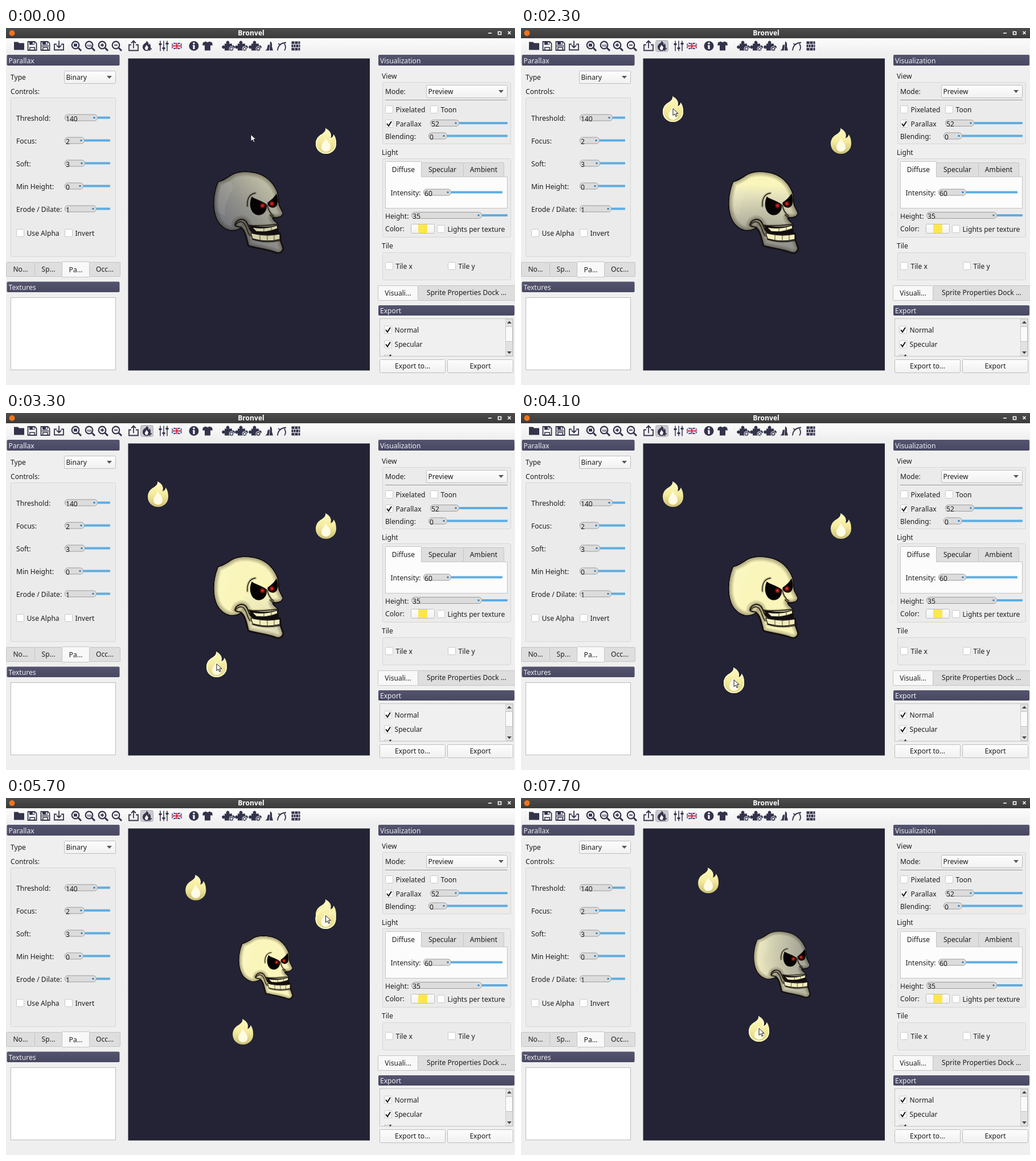
An HTML page with a canvas for the animation above (8 s loop, 894 px wide and 627 px high).

```html
<!DOCTYPE html>
<html lang="en">
<head>
<meta charset="utf-8">
<title>Bronvel</title>
<style>
html, body { margin: 0; width: 100%; height: 100%; overflow: hidden; background: #efefef; }
svg, canvas { position: absolute; left: 0; top: 0; }
text { font: 12.1px "Noto Sans", "Open Sans", sans-serif; }
</style>
</head>
<body>
<svg id="ui" width="894" height="627"></svg>
<canvas id="stage" width="894" height="627"></canvas>
<script>
const INK = '#33334c', LINE = '#bdbdbd';
const FLAME = 'M-1-22.5C6-19 11-13 8-5C11-6 13-8 13.5-11.5C17-7 18-1 18 5C18 15 10 22.5 0 22.5C-10 22.5-18 15-18 5C-18-2-15-7-10-10.5C-4-14 0-17-1-22.5Z';
const DROP = 'M-1.5-5C3 0 8 4 8 10.5C8 16 4 18.5 0 18.5C-4 18.5-8 16-8 10.5C-8 4-2 2-1.5-5Z';

// ---------- static window ----------
const rect = (x, y, w, h, fill, stroke = 'none', r = 0) => {
  const o = stroke === 'none' ? 0 : .5;
  return `<rect x="${x + o}" y="${y + o}" width="${w - 2 * o}" height="${h - 2 * o}" rx="${r}" fill="${fill}" stroke="${stroke}"/>`;
};
const text = (x, y, s, anchor = 'start', fill = '#1c1c1c', extra = '') =>
  `<text x="${x}" y="${y + 4.4}" text-anchor="${anchor}" fill="${fill}" ${extra}>${s}</text>`;
const path = (d, fill = INK, stroke = 'none', w = 1) =>
  `<path d="${d}" fill="${fill}" fill-rule="evenodd" stroke="${stroke}" stroke-width="${w}"/>`;
const wire = (d, w = 2) => path(d, 'none', INK, w);
const at = (x, y, s) => `<g transform="translate(${x} ${y})">${s}</g>`;
const group = (x, y, w, h) => rect(x, y, w, h, '#ebebeb', '#d6d6d6', 2);
const dock = (x, y, w, h, s) => rect(x, y, w, h, 'url(#dock)', 'none', 2) + text(x + 3, y + h / 2 + .6, s, 'start', '#f0f0f4');
const button = (x, y, w, h, s) => rect(x, y, w, h, 'url(#btn)', LINE, 2) + text(x + w / 2, y + h / 2, s, 'middle');
const combo = (x, y, w, s) => rect(x, y, w, 23, 'url(#btn)', LINE, 2) + text(x + 3.5, y + 12, s) +
  path(`M${x + w - 16} ${y + 9}h9l-4.5 5z`, '#555');
const check = (x, y, s, on) => rect(x, y - 7, 14, 14, '#fff', '#c9c9c9', 1) + text(x + 18.5, y + .4, s) +
  (on ? path(`M${x + 3} ${y}l3 4 5-8`, 'none', '#111', 2) : '');
const slider = (x, y, right, end, value) =>
  rect(right, y - 2, end - right, 4, '#5dade2', 'none', 1) +
  rect(x, y - 6, right - x, 12, '#dcdcdc', '#9b9b9b', 5) +
  rect(right - 7.5, y - 1.5, 3, 3, '#2f86c6') + text(x + 2, y + 1.6, value);
const tab = (x, y, w, h, s, on, fill = '#f8f8f8') =>
  rect(x, on ? y : y + 1, w, on ? h : h - 1, on ? fill : '#dedede', '#c4c4c4', 1) + text(x + w / 2, y + h / 2 + .5, s, 'middle');

const disk = wire('M-7.5-7.500h12l3 3v12h-15z', 1.8) + path('M-5-8h9v6h-9zM1-7v4h2v-4zM-5 2h10v6h-10zM-3.500 3.500v3h7v-3z');
const zoom = inner => `<circle cx="-1" cy="-1.5" r="6.3" fill="none" stroke="${INK}" stroke-width="2.2"/>` + wire('M4 3.5l5 5', 3) + inner;
const puzzle = mark => path('M-7-4h3.500a2.800 2.800 0 1 1 4 0h5.500v4a2.800 2.800 0 1 1 0 4v4h-13v-4a2.800 2.800 0 1 1 0-4z') +
  `<circle cx="5" cy="5" r="4" fill="${INK}" stroke="#f6f6f6"/>` + path(mark, 'none', '#f6f6f6', 1.3);
const icons = [
  [23, path('M-9-7h7l2 2h9v12h-18z')],
  [46, disk],
  [69, disk + path('M-6 0h12', 'none', INK, 1.5)],
  [93, wire('M-4-3h-4v10h16v-10h-4M0-9v11M-4-1l4 4 4-4', 1.8)],
  [123, zoom(path('M-4-4h6v5h-6z'))],
  [147, zoom(text(-1, -3.4, '100', 'middle', INK, 'style="font-size:5px;font-weight:bold"'))],
  [170, zoom(wire('M-4-1.5h6M-1-4.5v6', 1.8))],
  [194, zoom(wire('M-4-1.5h6', 1.8))],
  [224, wire('M-4-2h-4v10h16v-10h-4M0 4v-12M-4-5l4-4 4 4', 1.8)],
  [247, `<g transform="scale(.39)">${path(FLAME)}${path(DROP, '#f6f6f6')}</g>` + wire('M2 5h7M5.5 1.5v7', 2)],
  [277, wire('M-6-9v18M0-9v18M6-9v18', 1.5) + wire('M-8.5-3h5M-2.5 4h5M3.5-4h5', 3)],
  [300, rect(-9, -5.5, 18, 11, '#2b3d85') + path('M-9-5.5l18 11M9-5.5l-18 11', 'none', '#fff', 2) +
    path('M0-5.5v11M-9 0h18', 'none', '#fff', 4) + path('M0-5.5v11M-9 0h18', 'none', '#d32239', 2.2)],
  [330, `<circle r="8.5" fill="${INK}"/>` + path('M-1.5-6h3v3h-3zM-2-1.5h3.5v7h-3v-5h-.5z', '#fff')],
  [354, path('M-3-8L-8-6-9-1H-5V8H5V-1H9L8-6 3-8Q0-5-3-8z')],
  [391, puzzle('M2.5 5h5M5 2.5v5')],
  [414, puzzle('M3 3l4 4M7 3l-4 4')],
  [438, puzzle('M5 3v4M3 5h4')],
  [462, path('M-7 8q4-2 4-6l1-4h3l-1 10zM1 8l1-16q4 1 3 9l2 7z')],
  [485, wire('M-8 8q1-13 15-14M-7-4l5 2M4 8q4-5 0-12', 1.8)],
  [509, path('M-7.5-8h15v16h-15z') + path('M-8-3h16M-8 3h16M-2-8v5M4-8v5M0-3v6M-4-3v6M5-3v6M-2 3v5M4 3v5', 'none', '#f6f6f6')]
];
const shade = (id, a, b) => `<linearGradient id="${id}" x2="0" y2="1"><stop stop-color="${a}"/><stop offset="1" stop-color="${b}"/></linearGradient>`;

document.getElementById('ui').innerHTML = [
  '<defs>', shade('bar', '#4d4d4d', '#3a3a3a'), shade('tool', '#fcfcfc', '#efefef'),
  shade('dock', '#54546f', '#484862'), shade('btn', '#fdfdfd', '#f1f1f1'), '</defs>',
  rect(0, 0, 894, 18, 'url(#bar)'), rect(0, 18, 894, 28, 'url(#tool)'),
  '<circle cx="10.5" cy="9" r="5" fill="#f0741e"/>',
  text(430.5, 8.6, 'Bronvel', 'middle', '#fff', 'style="font-weight:bold"'),
  path('M847 9h6M864.500 6.500h5v5h-5zM881.500 6l5 5M886.500 6l-5 5', 'none', '#fff', 1.6),
  rect(236, 21, 23, 21, '#c9c9ce', '#b4b4ba', 3).replace('<rect', '<rect id="pressed"'),
  path([8, 266, 375].map(x => `M${x} 24v15`).join(''), 'none', '#ddd').replace('<path', '<path stroke-dasharray="1 2"'),
  ...icons.map(([x, s]) => at(x, 31.5, s)),

  dock(1.5, 47, 198, 19, 'Parallax'),
  text(8, 87, 'Type'), combo(102, 75, 91, 'Binary'), text(8, 112, 'Controls:'),
  group(8, 122, 185, 280),
  ...[['Threshold:', 161, 140], ['Focus:', 138, 2], ['Soft:', 139, 3], ['Min Height:', 136, 0], ['Erode / Dilate:', 159, 1]]
    .map(([s, right, v], i) => text(18, 159 + 40 * i, s) + slider(103, 157.5 + 40 * i, right, 183, v)),
  check(18, 360, 'Use Alpha'), check(103, 360, 'Invert'),
  tab(0, 410, 51, 27, 'No...'), tab(50, 410, 49, 27, 'Sp...'), tab(146, 410, 55, 27, 'Occ...'), tab(98, 410, 49, 28, 'Pa...', 1),
  dock(1.5, 445.5, 198, 18.5, 'Textures'), rect(8, 473, 185, 128, '#fff', '#bcbcbc'),

  dock(654, 47, 239, 19, 'Visualization'),
  text(660, 85, 'View'), group(661, 95, 226, 109),
  text(666, 112, 'Mode:'), combo(738, 100, 143, 'Preview'), rect(666, 126, 215, 1, '#999'),
  check(666, 143, 'Pixelated'), check(745, 143, 'Toon'), check(666, 168, 'Parallax', 1),
  slider(745, 167, 796, 881, 52), text(666, 191, 'Blending:'), slider(742, 189.5, 775, 881, 0),
  text(660, 219, 'Light'), group(661, 229, 226, 139),
  rect(666, 261, 215, 56, '#fcfcfc', '#c4c4c4'),
  tab(729, 235, 75, 27, 'Specular'), tab(803, 235, 72, 27, 'Ambient'), tab(666, 234, 64, 28, 'Diffuse', 1, '#fcfcfc'),
  rect(667, 260, 62, 3, '#fcfcfc'),
  text(675.5, 290, 'Intensity:'), slider(733, 288.5, 782, 872, 60),
  text(666, 330.5, 'Height:'), slider(712, 329, 836, 881, 35),
  text(666, 353, 'Color:'), rect(711, 344, 42, 17, 'url(#btn)', LINE, 2), rect(724, 345, 16, 15, '#fde74c'),
  check(757, 353, 'Lights per texture'),
  text(660, 383, 'Tile'), group(661, 394, 226, 49), check(666, 418, 'Tile x'), check(776, 418, 'Tile y'),
  tab(723, 451, 175, 28, ''), text(739, 465, 'Sprite Properties Dock ...'), tab(653, 452, 71, 27, 'Visuali...', 1),
  dock(654, 487, 239, 18, 'Export'), rect(656, 510, 235, 67, '#f0f0f0', '#c4c4c4'),
  check(664, 530, 'Normal', 1), check(664, 555.5, 'Specular', 1),
  rect(664, 574, 14, 3, '#fff', '#bdbdbd'), path('M674 576l2-2', 'none', '#111', 2),
  rect(877, 511, 13, 65, '#e2e2e2', '#cfcfcf'), rect(877, 524, 13, 27, '#fafafa', '#c4c4c4'),
  path('M880 519h8l-4-4.500zM880 568h8l-4 4.500z', '#444'),
  button(656, 582, 116, 24, 'Export to...'), button(775, 582, 116, 24, 'Export'),
  path('M204 326v7M650 326v7M97 440h7', 'none', '#ccc').replace('<path', '<path stroke-dasharray="1 2"'),
  rect(214.5, 53.5, 424.5, 548, '#232335')
].join('');

// ---------- motion ----------
const END = Infinity;
const ease = {
  both: u => u * u * (3 - 2 * u),
  out: u => 1 - (1 - u) ** 2,
  in: u => u ** 1.5
};
// time, x, y, easing on the way there
const route = [
  [200, 430, 188], [1000, 246, 33, 'both'], [1300, 246, 33, 'both'],
  [2200, 266, 141, 'both'], [2300, 267, 142.5, 'both'], [2800, 267, 142.5, 'both'],
  [3300, 370, 441.5, 'both'], [3600, 374, 469.5, 'out'], [4300, 374, 469.5, 'both'],
  [4700, 551, 240, 'both'], [5200, 561.5, 211.5, 'out'], [5400, 561.5, 207.5, 'both'],
  [6300, 561.5, 207.5, 'both'], [6700, 531.5, 384.5, 'in'], [7200, 418, 405.5, 'out']
];
const placed = [
  { x: 562, y: 198.5, from: 0, to: 5900 },
  { x: 267, y: 142.5, from: 2700, to: END },
  { x: 374, y: 469.5, from: 4100, to: 7700 }
];
const zooms = [[5700, 561.5, 207.5, .775], [7500, 418, 405.5, 1.05]];
const ADD = 1400;

function along(t) {
  const i = route.findIndex(k => k[0] > t);
  if (i === 0) return { x: route[0][1], y: route[0][2] };
  if (i < 0) return { x: route.at(-1)[1], y: route.at(-1)[2] };
  const [t0, x0, y0] = route[i - 1], [t1, x1, y1, kind] = route[i];
  const u = ease[kind]((t - t0) / (t1 - t0));
  return { x: x0 + (x1 - x0) * u, y: y0 + (y1 - y0) * u };
}
function viewAt(t) {
  const v = { k: 1, x: 0, y: 0 };
  for (const [start, cx, cy, k] of zooms) if (t >= start) {
    v.k *= k;
    v.x = cx + (v.x - cx) * k;
    v.y = cy + (v.y - cy) * k;
  }
  return v;
}

// ---------- drawing ----------
const c = document.getElementById('stage').getContext('2d');
const P = d => new Path2D(d);
const flame = P(FLAME), drop = P(DROP);
const arrow = P('M0 0V12L3 9.400 5 14 7 13 5 8.600H9Z');
const cranium = P('M373 271C383 268 390 263 398 258C406 253.500 420 252 433 254.500C453 257 468 270 475 287C479 297 477 305 479 312L485.500 325C483 333 474 333 467 333C468 339 475 341 477 346C477 352 470 353 462 354C448 357 436 356 428 351L420 343C412 352 405 356 393 354.500C378 350 368 338 366 315C365 297 368 284 373 271Z');
const jaw = P('M402 346C404 337 414 333 421 339C427 346 426 355 433 359C448 363 465 364 481 361L482 374L486.500 387C485 394 480 396 474 394C455 387 440 387 426 382C423 371 421 356 413 350C408 348 404 350 402 346Z');
const mouth = P('M426 345C445 351 465 350 476 346L478 352L480 363L434 362Z');
const upperTeeth = P('M432 350C445 353 465 351 476 346.500L477 352C465 357 452 359 439 357Z');
const lowerTeeth = P('M430 360C448 365 465 365 481 362L481 371C465 375 447 374 433 370Z');
const gaps = P('M453 352v6M466 351v5M446 363v10M459 364v10M471 363v10');
const eyes = P('M432 297C438 302 448 303 457 310C459 320 452 328 443 328C431 327 426 311 432 297ZM460 307C464 304 471 299 475 292C479 303 477 314 469 315C463 315 460 311 460 307Z');
const creases = P('M424 313C423 300 428 291 438 290M459 311C460 318 464 326 470 330M464 328C468 333 474 334 480 332M428 347C445 348 462 346 476 345M404 345C410 338 417 340 420 346C424 353 424 360 429 365M433 371C448 376 466 376 481 373');
const facet = P('M375 273C390 265 402 272 398 284C390 296 384 310 384 330L368 320C367 300 370 285 375 273Z');
const bone = new Path2D(cranium);
bone.addPath(jaw);
const CX = 426, CY = 324;

function stroke(p, color, w) {
  c.strokeStyle = color;
  c.lineWidth = w;
  c.stroke(p);
}
function fill(p, color) {
  c.fillStyle = color;
  c.fill(p);
}
function flood(color) {
  c.fillStyle = color;
  c.fillRect(350, 240, 150, 170);
}
function drawSkull(lights, v) {
  c.save();
  c.translate(v.x, v.y);
  c.scale(v.k, v.k);
  c.lineJoin = c.lineCap = 'round';
  fill(mouth, '#0d0a0c');
  stroke(bone, '#100d10', 3.6);

  c.save();
  c.clip(bone);
  flood('#5e606f');
  c.globalCompositeOperation = 'lighter';
  for (const l of lights) {
    const dx = l.x - v.x - CX * v.k, dy = l.y - v.y - CY * v.k, n = 75 / (Math.hypot(dx, dy) || 1);
    const g = c.createLinearGradient(CX - dx * n, CY - dy * n, CX + dx * n, CY + dy * n);
    g.addColorStop(0, 'rgb(6,6,4)');
    g.addColorStop(.5, 'rgb(50,48,28)');
    g.addColorStop(1, 'rgb(110,106,62)');
    flood(g);
  }
  c.globalCompositeOperation = 'darken';
  flood('#faf5bb');
  c.globalCompositeOperation = 'source-over';
  fill(facet, 'rgba(255,255,235,.08)');
  for (const w of [14, 9, 5]) stroke(bone, 'rgba(45,38,20,.12)', w);
  stroke(creases, 'rgba(60,50,25,.2)', 5);
  c.restore();

  stroke(jaw, '#17120f', 2);
  fill(mouth, '#120e10');
  for (const teeth of [upperTeeth, lowerTeeth]) {
    fill(teeth, lights.length > 1 ? '#f3eebc' : '#d4d0aa');
    stroke(teeth, '#17120f', 1.2);
  }
  stroke(gaps, '#4d452f', 1);
  stroke(creases, '#17120f', 1.4);
  fill(eyes, '#050304');
  stroke(eyes, '#0c0808', 1.5);
  for (const [x, y] of [[450.5, 312], [467, 308.5]]) {
    const g = c.createRadialGradient(x, y, 0, x, y, 6);
    g.addColorStop(0, lights.length > 2 ? '#ff4a28' : '#e23420');
    g.addColorStop(.35, '#b51a10');
    g.addColorStop(1, 'rgba(90,0,0,0)');
    c.fillStyle = g;
    c.fillRect(x - 6, y - 6, 12, 12);
  }
  c.restore();
}
function drawLight({ x, y }, active) {
  c.save();
  c.translate(x, y);
  const g = c.createLinearGradient(0, -22, 0, 23);
  g.addColorStop(0, '#fffbc0');
  g.addColorStop(.5, '#f4eb9e');
  g.addColorStop(1, active ? '#ddd384' : '#c9bf74');
  fill(flame, g);
  if (active) {
    c.clip(flame);
    stroke(flame, '#fffac6', 3.5);
  }
  fill(drop, '#fffbe4');
  c.restore();
}
function draw(t) {
  const v = viewAt(t), p = along(t), adding = t >= ADD;
  const lights = placed.filter(l => t >= l.from && t < l.to)
    .map(l => ({ x: v.x + l.x * v.k, y: v.y + l.y * v.k }));
  if (adding) lights.push(p);
  c.clearRect(0, 0, 894, 627);
  c.save();
  c.beginPath();
  c.rect(214, 54, 425, 547);
  c.clip();
  drawSkull(lights, v);
  lights.forEach((l, i) => drawLight(l, i === lights.length - 1));
  c.restore();

  // the pointer runs slightly ahead of the light in the last drag
  const tip = along(t > 6300 ? t + 50 : t);
  c.save();
  c.translate(tip.x, tip.y - 1);
  fill(arrow, '#fff');
  stroke(arrow, '#15151c', 1);
  c.restore();
  document.getElementById('pressed').style.opacity = adding ? 1 : t >= 1000 ? .5 : 0;
}

const STEP = 100, LOOP = 8000, begin = performance.now();
function tick() {
  const t = (performance.now() - begin) % LOOP;
  draw(Math.floor(t / STEP) * STEP);
  requestAnimationFrame(tick);
}
tick();
</script>
</body>
</html>
```
